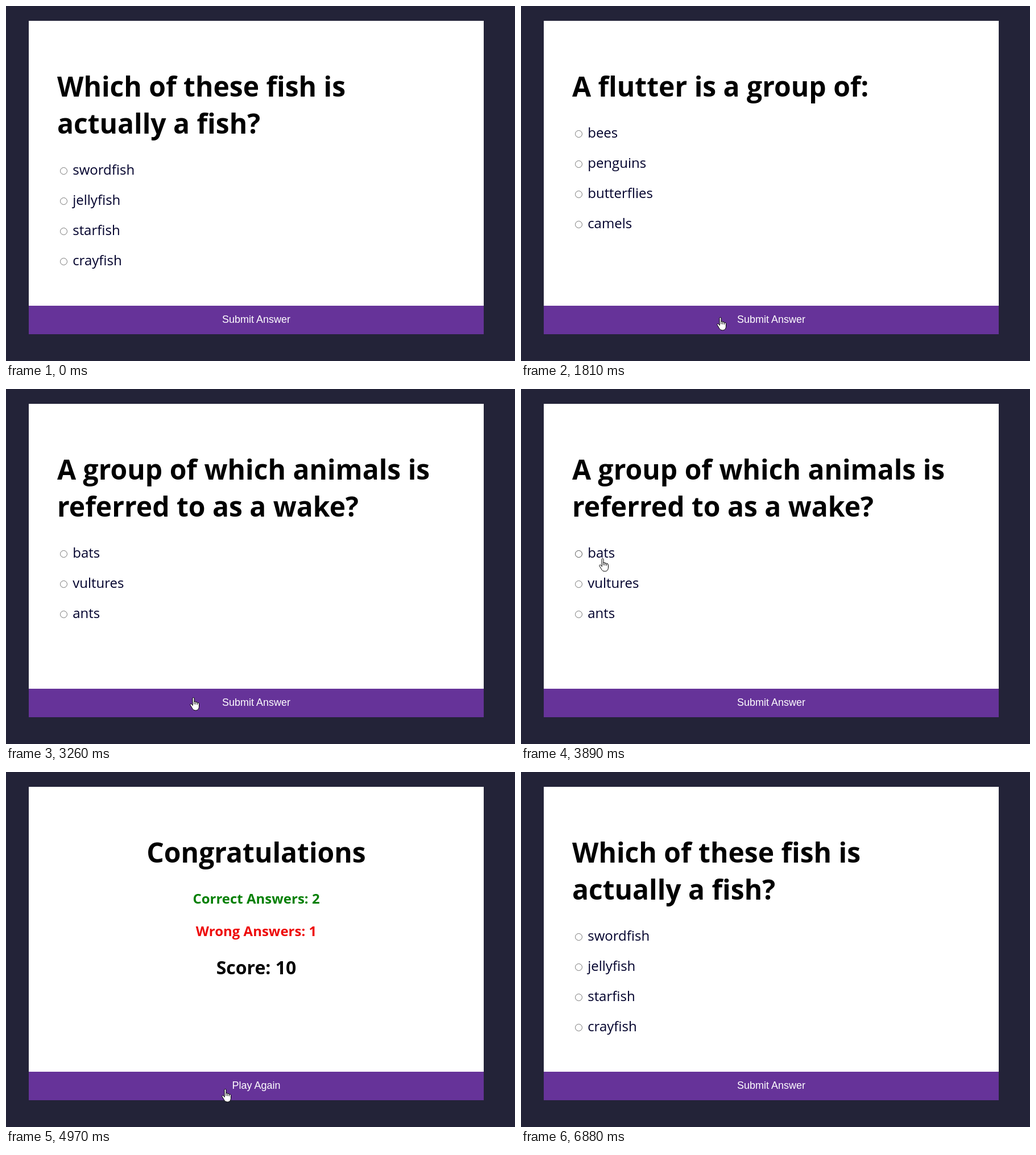
An HTML page for the animation above (7.7 s loop, 895x623 px).

```html
<!DOCTYPE html>
<html lang="en">
<head>
<meta charset="utf-8">
<title>Quiz</title>
<style>
  html, body { margin: 0; width: 100%; height: 100%; overflow: hidden; background: #232338; }
  svg { display: block; }
  text { font-family: "Open Sans", sans-serif; white-space: pre; }
  .heading { font-size: 48px; font-weight: 700; }
  .option { font-size: 24px; fill: #00002c; }
  .tally { font-size: 24px; font-weight: 700; }
  .score { font-size: 32px; font-weight: 700; }
  .button { font: 18px Arial, "Liberation Sans", sans-serif; fill: #fff; }
  .middle { text-anchor: middle; }
</style>
</head>
<body>
<svg id="stage" width="895" height="623" viewBox="0 0 895 623">
  <rect width="895" height="623" fill="#232338"/>
  <rect x="40" y="26" width="800" height="500" fill="#fff"/>
  <rect x="40" y="526" width="800" height="50" fill="#663399"/>
  <g id="scenes"></g>
  <g id="cursor" fill="#fff" stroke="#000" stroke-linejoin="round" stroke-linecap="round">
    <path id="arrow" d="M.5 .7V16.6L4.2 13L6.6 18.5L9 17.5L6.6 12.1H11.7Z"/>
    <g id="hand" transform="translate(-6 0)">
      <path d="M5 2a1.5 1.5 0 0 1 3 0V7.6Q10.6 6.8 10.8 8.6Q13.3 7.8 13.6 9.6Q16.2 9 16.5 11.4V16C16.5 20.5 14 23 10.5 23C6.8 23 5.2 21 4 18.5L1 13.6C.2 12 2.4 10.8 3.6 12.4L5 14.2Z"/>
      <path fill="none" d="M8 7.6V12M10.8 8.6V12.3M13.6 9.6V12.6"/>
    </g>
  </g>
</svg>
<script>
const LOOP = 7700, TICK = 90, SHOW_AT = 90, HIDE_AT = 6880;
const LINE = 65, ROW = 53;

const questions = [
  { lines: ["Which of these fish is", "actually a fish?"],
    options: ["swordfish", "jellyfish", "starfish", "crayfish"], pick: 0, pickAt: 720 },
  { lines: ["A flutter is a group of:"],
    options: ["bees", "penguins", "butterflies", "camels"], pick: 2, pickAt: 2530 },
  { lines: ["A group of which animals is", "referred to as a wake?"],
    options: ["bats", "vultures", "ants"], pick: 0, pickAt: 4070 }
];
const sceneStarts = [0, 1720, 3260, 4790, 6520];

// Pointer moves: start time, ticks, destination x, y
const moves = [
  [0, 1, 198, 501], [180, 4, 160, 279],
  [900, 4, 352, 570], [1260, 1, 359, 555],
  [1810, 8, 139, 338], [2620, 1, 139, 339], [2710, 4, 329, 541],
  [3350, 8, 135, 286], [4160, 5, 368, 560],
  [4790, 1, 372, 561], [4880, 8, 452, 526], [5600, 2, 459, 548],
  [6610, 3, 500, 56]
];

const byId = id => document.getElementById(id);
const show = (node, on) => node.setAttribute("visibility", on ? "inherit" : "hidden");

function add(parent, tag, attrs, text = "") {
  const node = document.createElementNS("http://www.w3.org/2000/svg", tag);
  for (const name in attrs) node.setAttribute(name, attrs[name]);
  node.textContent = text;
  return parent.appendChild(node);
}

const label = (parent, cls, x, y, text, fill = "") =>
  add(parent, "text", fill ? { class: cls, x, y, fill } : { class: cls, x, y }, text);

function buildQuestion({ lines, options }) {
  const group = add(byId("scenes"), "g", {});
  lines.forEach((line, i) => label(group, "heading", 90, 159 + i * LINE, line));
  const rows = options.map((option, i) => {
    const y = 166 + lines.length * LINE + i * ROW;
    const text = label(group, "option", 117.2, y, option);
    const circle = { cx: 101.5, cy: y - 6.5 };
    return {
      y, text,
      ring: add(group, "circle", { ...circle, r: 6, fill: "#fff" }),
      dot: add(group, "circle", { ...circle, r: 4 })
    };
  });
  label(group, "button middle", 440, 556, "Submit Answer");
  return { group, rows };
}

function buildResult() {
  const group = add(byId("scenes"), "g", {});
  label(group, "heading middle", 440, 159, "Congratulations");
  label(group, "tally middle", 440, 231, "Correct Answers: 2", "#058005");
  label(group, "tally middle", 440, 288, "Wrong Answers: 1", "#ee0b0b");
  label(group, "score middle", 440, 355, "Score: 10");
  label(group, "button middle", 440, 556, "Play Again");
  return { group, rows: [] };
}

const scenes = [...questions.map(buildQuestion), buildResult()];
const ease = p => p * p * (3 - 2 * p);

function pointerAt(time) {
  let x = 198, y = 501;
  for (const [start, ticks, toX, toY] of moves) {
    if (time < start) break;
    const step = Math.min(ticks, Math.floor((time - start) / TICK) + 1);
    const p = ease(step / ticks);
    x += (toX - x) * p;
    y += (toY - y) * p;
  }
  return { x: Math.round(x), y: Math.round(y) };
}

const overRow = (row, { x, y }) =>
  x >= 90 && x < 117 + row.text.getComputedTextLength() && y >= row.y - 26 && y < row.y + 7;

function render(time) {
  const phase = sceneStarts.filter(start => time >= start).length - 1;
  const current = phase % scenes.length;
  const visible = time >= SHOW_AT && time < HIDE_AT;
  const pointer = pointerAt(time);
  let overLink = pointer.y >= 526 && pointer.y < 576;

  scenes.forEach((scene, i) => show(scene.group, i === current));
  scenes[current].rows.forEach((row, i) => {
    const { pick, pickAt } = questions[current];
    const checked = phase < scenes.length && i === pick && time >= pickAt;
    const hover = visible && overRow(row, pointer);
    overLink = overLink || hover;
    const blue = hover ? "#005cc8" : "#0075ff";
    row.ring.setAttribute("stroke", checked ? blue : hover ? "#4f4f4f" : "#767676");
    row.dot.setAttribute("fill", checked ? blue : "none");
  });

  byId("cursor").setAttribute("transform", `translate(${pointer.x} ${pointer.y})`);
  show(byId("cursor"), visible);
  show(byId("hand"), overLink);
  show(byId("arrow"), !overLink);
}

const began = performance.now();
function frame() {
  render((performance.now() - began) % LOOP);
  requestAnimationFrame(frame);
}
frame();
</script>
</body>
</html>
```
